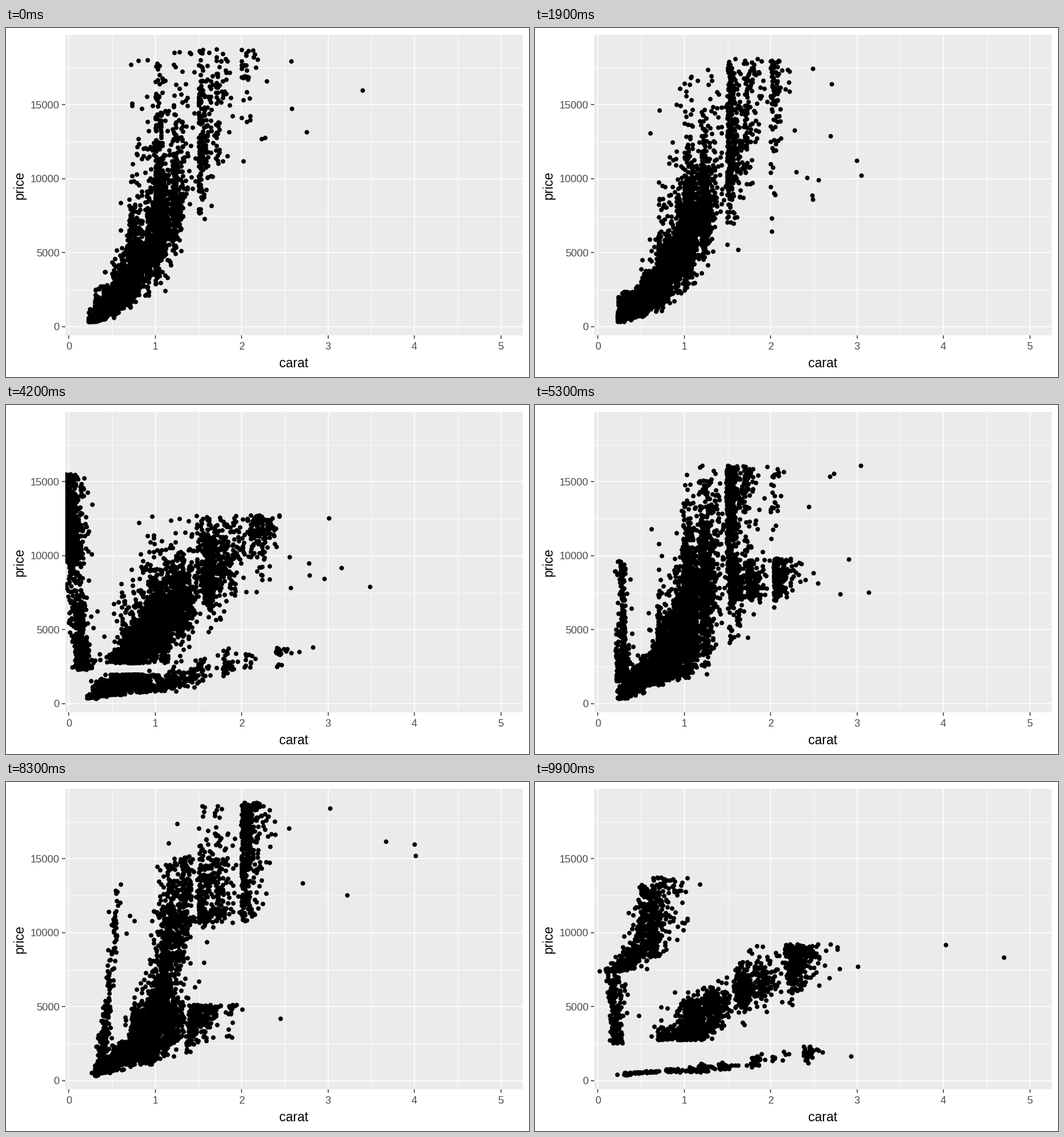
Write a matplotlib script that moves like this. It is 917 px wide and 611 px high and loops after 10 s.

```python
import matplotlib.pyplot as plt
import numpy as np
from matplotlib.animation import FuncAnimation

W, H, DPI = 917, 611, 100
FRAMES, INTERVAL = 100, 100
PX = 72 / DPI
MID, TOP = 2757, 18823

plt.rcParams["font.family"] = "Liberation Sans"

# Popular carat sizes and how often they occur
SIZES = np.array([.23, .3, .4, .5, .6, .7, .8, .9, 1, 1.2, 1.5, 1.7, 2])
SHARE = np.array([1, 8, 4, 5, 1.5, 8, 1.2, 3, 8, 3, 2.5, .8, 2.5])

# Stones per colour grade, and how many of them cost more than MID
COUNTS = [6775, 9797, 9542, 11292, 8304, 5422, 2808]
COSTLY = [2700, 3700, 4390, 5250, 4700, 3250, 1880]

# The largest stones of each grade
LARGE = [
    [(3.4, 15964), (2.75, 13156), (2.58, 14749), (2.57, 17950)],
    [(3.05, 10453), (3, 11530), (2.71, 17000)],
    [(3.01, 9925), (2.67, 18400)],
    [(3.02, 13400), (3.07, 14450), (2.85, 18700)],
    [(4.13, 17329), (3.65, 11668), (3.5, 12587), (3.24, 12300)],
    [(4.01, 15223), (4, 15984), (3.67, 16193), (3.22, 12545), (3.02, 18400)],
    [(5.01, 18018), (4.5, 18531), (4.01, 15223), (3.51, 18701)],
]

# First changed frame and number of steps of each transition
STEPS = [11] * 3 + [10] * 4
STARTS = [4 + sum(STEPS[:i]) + 4 * i for i in range(len(STEPS))]


def by_price(stones):
    return stones[np.argsort(stones[:, 1], kind="stable")]


def make_group(grade):
    """Rows of (carat, price): costly ones mixed with the cheapest, then the rest."""
    rng = np.random.default_rng(grade + 11)
    count, n_high = COUNTS[grade], COSTLY[grade]
    base = 5000 - 42 * grade ** 2
    tail = .2 - .015 * grade if grade else .27
    share = SHARE * SIZES ** (.036 * grade ** 2)
    pool = 120000
    size = rng.choice(SIZES, pool, p=share / share.sum())
    carat = np.round(size + rng.exponential(.03 + .03 * size) - .004, 2)
    spread = tail * np.where(carat < .6, .75, 1)
    price = base * carat ** 1.85 * np.exp(
        .2 * rng.normal(size=pool) + spread * rng.exponential(size=pool))
    price *= np.where(rng.random(pool) < .02, .6, 1)
    stones = np.column_stack([carat, price])

    def pick(low, high, n):
        return stones[(price >= low) & (price < high)][:n]

    n_cheap = round(n_high * .105)
    n_odd = 6 if grade else 0
    odd = np.column_stack([rng.uniform(2.25, 2.75, n_odd),
                           rng.uniform(9000, 18500, n_odd)])
    rare = np.vstack([LARGE[grade], odd])
    high = by_price(np.vstack([rare, pick(MID, TOP, n_high - len(rare))]))
    cheap = by_price(pick(335, 554, n_cheap))
    rest = by_price(pick(554, MID, count - n_high - n_cheap))

    mixed = np.empty((len(high) + len(cheap), 2))
    is_cheap = np.zeros(len(mixed), bool)
    is_cheap[rng.choice(len(mixed), len(cheap), replace=False)] = True
    mixed[is_cheap], mixed[~is_cheap] = cheap, high
    return np.vstack([mixed, rest])


groups = [make_group(i) for i in range(len(COUNTS))]


def elastic_in(t):
    return np.sin(6.5 * np.pi * t) * 2 ** (10 * (t - 1))


def stones_at(frame):
    if frame < STARTS[0]:
        return groups[0]
    i = max(k for k, s in enumerate(STARTS) if s <= frame)
    a, b = groups[i], groups[(i + 1) % len(groups)]
    t = (frame - STARTS[i] + 1) / STEPS[i]
    if t >= 1:
        return b
    # Unpaired stones wait in place; new ones appear at the end
    n = min(len(a), len(b))
    out = a.copy()
    out[:n] += (b[:n] - a[:n]) * [elastic_in(t), t]
    return out


fig = plt.figure(figsize=(W / DPI, H / DPI), dpi=DPI, facecolor="white")
left, right, top, bottom = 104.3, 905.5, 11.5, 538.3
ax = fig.add_axes([left / W, 1 - bottom / H, (right - left) / W, (bottom - top) / H],
                  facecolor="#EBEBEB")
ax.set_xlim(-.0405, 5.2505)
ax.set_ylim(-598.85, 19747.85)
ax.set_xticks(range(6))
ax.set_xticks(np.arange(.5, 5), minor=True)
ax.set_yticks(range(0, 15001, 5000))
ax.set_yticks(range(2500, 17501, 5000), minor=True)
ax.set_axisbelow(True)
ax.grid(which="major", color="white", lw=1.6 * PX)
ax.grid(which="minor", color="white", lw=.9 * PX)
ax.tick_params(which="minor", length=0)
ax.tick_params(which="major", length=5.7 * PX, width=1.5 * PX, color="#333333",
               labelcolor="#4D4D4D", labelsize=18.33 * PX, pad=4.6 * PX)
ax.tick_params(axis="x", pad=6 * PX)
for spine in ax.spines.values():
    spine.set_visible(False)

title = dict(fontsize=22.9 * PX, color="black", ha="center", va="baseline")
fig.text((left + right) / 2 / W, 1 - 594 / H, "carat", **title)
fig.text(31 / W, 1 - (top + bottom) / 2 / H, "price", rotation=90,
         rotation_mode="anchor", **title)

dots, = ax.plot([], [], "o", color="black", ms=8 * PX, mew=0)


def update(frame):
    dots.set_data(*stones_at(frame).T)
    return dots,


anim = FuncAnimation(fig, update, frames=FRAMES, interval=INTERVAL,
                     repeat=True, repeat_delay=0)
plt.show()
```
